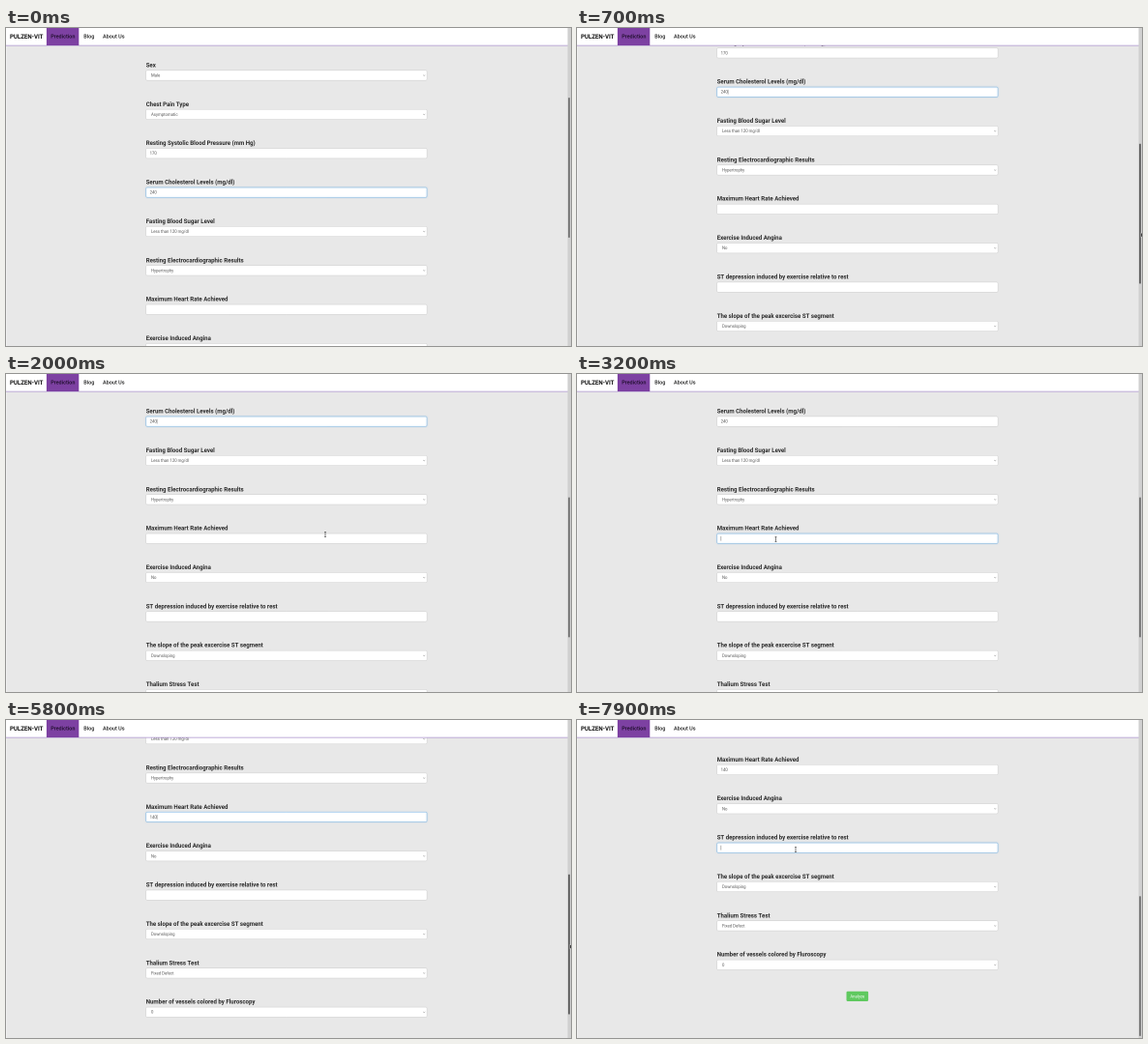
An HTML page with a canvas that plays this animation: 584x329 px, repeating every 8 s.

```html
<!DOCTYPE html>
<html lang="en">
<head>
<meta charset="utf-8">
<title>Prediction form</title>
<style>
  html, body { margin: 0; width: 584px; height: 329px; overflow: hidden; background: #e8e8e8; }
  canvas { display: block; width: 584px; height: 329px; }
</style>
</head>
<body>
<canvas id="stage" width="1168" height="658"></canvas>
<script>
const ctx = document.getElementById('stage').getContext('2d');
const W = 584, H = 329, LOOP = 8000, STEP = 100;
const FONT = 'Roboto, Arial, sans-serif';
const LEFT = 144.7, WIDTH = 290.4, BOX_H = 10.3, PITCH = 40.37, FIRST = 49;
const BAR_RATE = 0.459, BAR_TOP = 72, BAR_H = 145;
const BLINK = 550;

// label, value, is a select
const rows = [
  ['Sex', 'Male', true],
  ['Chest Pain Type', 'Asymptomatic', true],
  ['Resting Systolic Blood Pressure (mm Hg)', '170', false],
  ['Serum Cholesterol Levels (mg/dl)', '240', false],
  ['Fasting Blood Sugar Level', 'Less than 120 mg/dl', true],
  ['Resting Electrocardiographic Results', 'Hypertrophy', true],
  ['Maximum Heart Rate Achieved', '', false],
  ['Exercise Induced Angina', 'No', true],
  ['ST depression induced by exercise relative to rest', '', false],
  ['The slope of the peak excercise ST segment', 'Downsloping', true],
  ['Thalium Stress Test', 'Fixed Defect', true],
  ['Number of vessels colored by Fluroscopy', '0', true]
];
const RATE = 6;

const focusChanges = [{ at: -600, row: 3 }, { at: 3000, row: RATE }, { at: 7700, row: 8 }];
const keyPresses = [3700, 4100, 4200];

// moves: [start, duration, ...where to]
const scrollMoves = [[240, 700, 121], [5520, 700, 239.8]];
const pointerMoves = [
  [240, 700, 583, 219.5],    // drag the scrollbar
  [1100, 300, 330, 166],
  [2100, 400, 240, 276],
  [2500, 500, 205.5, 171],   // heart rate field
  [4500, 200, 436, 160],
  [4800, 200, 72, 22],
  [5100, 100, 47, 3],
  [5200, 300, 583, 200],
  [5520, 700, 583, 254.5],   // drag again
  [6300, 400, 358, 286],
  [7400, 400, 226, 134]      // ST depression field
];

function follow(from, moves, t) {
  let at = from;
  for (const [start, time, ...to] of moves) {
    if (t <= start) break;
    const p = Math.sin(Math.min(1, (t - start) / time) * Math.PI / 2);
    at = at.map((v, i) => v + (to[i] - v) * p);
  }
  return at;
}

function text(s, x, y, size, weight, color, align = 'left') {
  ctx.font = `${weight} ${size}px ${FONT}`;
  ctx.fillStyle = color;
  ctx.textAlign = align;
  ctx.fillText(s, x, y);
}

function rect(x, y, w, h, color) {
  ctx.fillStyle = color;
  ctx.fillRect(x, y, w, h);
}

function roundBox(x, y, w, h, r, fill) {
  ctx.beginPath();
  ctx.roundRect(x, y, w, h, r);
  ctx.fillStyle = fill;
  ctx.fill();
}

function stroke(color, width) {
  ctx.strokeStyle = color;
  ctx.lineWidth = width;
  ctx.stroke();
}

function formState(t) {
  const { at, row } = focusChanges.findLast(f => f.at <= t);
  const pressed = keyPresses.filter(k => k <= t);
  const lastAction = Math.max(at, ...pressed);
  return {
    row,
    glow: Math.min(1, (t - at + 80) / 240),
    rate: '140'.slice(0, pressed.length),
    caret: (t - lastAction) % (2 * BLINK) < BLINK
  };
}

const rowMid = (i, scroll) => FIRST + i * PITCH - scroll;

function drawRow(i, scroll, form) {
  const mid = rowMid(i, scroll);
  const [label, fixed, select] = rows[i];
  const value = i === RATE ? form.rate : fixed;
  const x = select ? 150 : 148.6;

  text(label, LEFT, mid - 8.6, 6.08, 700, '#2a2a2a');
  roundBox(LEFT, mid - BOX_H / 2, WIDTH, BOX_H, 1.2, '#fff');
  stroke('#c4c4c4', 0.4);

  if (i === form.row) {
    ctx.save();
    ctx.globalAlpha = form.glow;
    ctx.shadowColor = 'rgba(102,175,233,.55)';
    ctx.shadowBlur = 3;
    stroke('#8abfea', 0.5);
    ctx.restore();
  }

  text(value, x, mid + 1.5, 4.26, 400, '#5a5a5a');
  if (i === form.row && form.caret) {
    rect(x + ctx.measureText(value).width + 0.1, mid - 2.4, 0.4, 4.8, '#444');
  }
  if (select) {
    ctx.beginPath();
    ctx.moveTo(431.2, mid - 0.4);
    ctx.lineTo(432.2, mid + 0.5);
    ctx.lineTo(433.2, mid - 0.4);
    stroke('#777', 0.5);
  }
}

function drawButton(scroll) {
  const mid = 525.6 - scroll;
  roundBox(278.5, mid - 5.1, 22.6, 10.3, 1.2, '#5fc95f');
  text('Analyze', 289.8, mid + 1.5, 4.26, 400, '#fff', 'center');
}

function drawNav() {
  rect(0, 0, 580.5, 18, '#fff');
  rect(0, 17.7, 580.5, 0.9, '#b8a2d4');
  rect(41.9, 0, 33.4, 18, '#7d41a2');
  text('PULZEN-VIT', 4, 10.9, 6.08, 700, '#111');
  text('Prediction', 46.2, 10.5, 5.5, 500, '#1c0c28');
  text('Blog', 80.2, 10.5, 5.5, 500, '#1c1c1c');
  text('About Us', 100, 10.5, 5.5, 500, '#1c1c1c');
}

function drawScrollbar(scroll, hot) {
  rect(580.5, 0, 3.5, H, '#d0d0d0');
  roundBox(581, BAR_TOP + scroll * BAR_RATE, 2, BAR_H, 0.9, hot ? '#686868' : '#7c7c7c');
}

function drawArrow(x, y) {
  ctx.beginPath();
  [[0, 0], [0, 5], [1.2, 3.9], [2, 5.6], [2.8, 5.2], [2, 3.6], [3.6, 3.5]]
    .forEach(([dx, dy]) => ctx.lineTo(x + dx, y + dy));
  ctx.closePath();
  ctx.fillStyle = '#111';
  ctx.fill();
  stroke('#fff', 0.4);
}

function drawBeam(x, y) {
  rect(x - 0.3, y - 2.6, 0.6, 5.2, '#333');
  rect(x - 1, y - 2.8, 2, 0.5, '#333');
  rect(x - 1, y + 2.3, 2, 0.5, '#333');
}

function drawPointer(x, y, scroll) {
  const onInput = rows.some(([, , select], i) =>
    !select && x > LEFT && x < LEFT + WIDTH &&
    Math.abs(y - rowMid(i, scroll)) < BOX_H / 2);
  (onInput ? drawBeam : drawArrow)(x, y);
}

function draw(t) {
  const [scroll] = follow([0], scrollMoves, t);
  const [x, y] = follow([583, 164], pointerMoves, t);
  const form = formState(t);
  // the pointer hides while typing
  const shown = t >= STEP && (t < keyPresses[0] || t >= 4600);

  ctx.setTransform(2, 0, 0, 2, 0, 0);
  rect(0, 0, W, H, '#e8e8e8');
  rect(0, 0, 0.7, H, '#f6f6f6');
  rows.forEach((_, i) => drawRow(i, scroll, form));
  drawButton(scroll);
  drawNav();
  drawScrollbar(scroll, shown && x > 580);
  if (shown) drawPointer(x, y, scroll);
}

const start = performance.now();
function tick() {
  const t = (performance.now() - start) % LOOP;
  draw(Math.floor(t / STEP) * STEP);
  requestAnimationFrame(tick);
}
tick();
</script>
</body>
</html>
```
